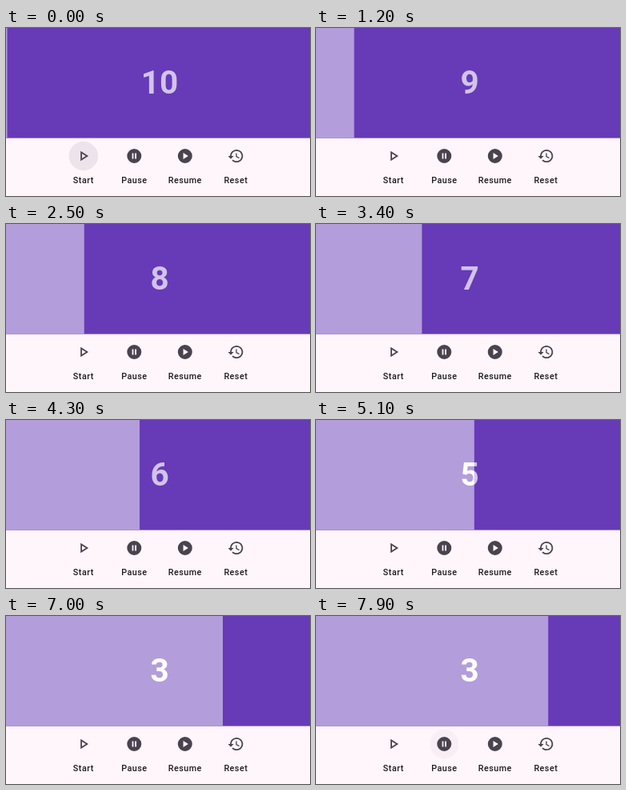
An HTML page that plays this animation: 380 px wide and 210 px high, repeating every 8 s.

```html
<!DOCTYPE html>
<html lang="en">
<head>
<meta charset="utf-8">
<title>Countdown</title>
<style>
  html, body { margin: 0; width: 100%; height: 100%; overflow: hidden; background: #fff6fc; }
  svg { display: block; width: 380px; height: 210px; }
  text { font-family: Roboto, sans-serif; text-anchor: middle; }
  .digit { font-size: 40.5px; font-weight: 700; }
  .label { font-size: 10.8px; font-weight: 500; letter-spacing: .45px; fill: #1d1b20; }
  .icon { fill: #49434f; }
  .halo { fill: #49434f; opacity: 0; }
</style>
</head>
<body>
<svg viewBox="0 0 380 210">
  <clipPath id="done"><rect id="bar" width="0" height="137.6"/></clipPath>
  <rect width="380" height="137.6" fill="#673ab7"/>
  <text class="digit" x="192" y="82" fill="#d1c4e9"></text>
  <g clip-path="url(#done)">
    <rect width="380" height="138" fill="#b39ddb"/>
    <text class="digit" x="192" y="82" fill="#fff"></text>
  </g>
  <g id="buttons"></g>
</svg>
<script>
const LOOP = 8000, STEP = 100, PAUSE_AT = 7500;
const disc = 'M12 2a10 10 0 1 0 0 20a10 10 0 1 0 0-20z';
const buttons = [
  ['Start', 'M10 8.64L15.27 12 10 15.36V8.64M8 5v14l11-7z'],
  ['Pause', disc + 'M9 8h2v8H9zM13 8h2v8h-2z'],
  ['Resume', disc + 'M9.5 16.5v-9l7 4.5z'],
  ['Reset', 'M13 3c-4.97 0-9 4.03-9 9H1l3.89 3.89.07.14L9 12H6c0-3.87 3.13-7 7-7s7 3.13 7 7-3.13 7-7 7c-1.93 0-3.68-.79-4.94-2.06l-1.42 1.42C8.27 19.99 10.51 21 13 21c4.97 0 9-4.03 9-9s-4.03-9-9-9zm-1 5v5l4.28 2.54.72-1.21-3.5-2.08V8z']
];

document.getElementById('buttons').innerHTML = buttons.map(([name, path], i) => `
  <g transform="translate(${96.8 + 63.5 * i} 160)">
    <circle class="halo" r="18.2"/>
    <path class="icon" fill-rule="evenodd" transform="scale(.9) translate(-12 -12)" d="${path}"/>
    <text class="label" y="34.2">${name}</text>
  </g>`).join('');

const bar = document.getElementById('bar');
const digits = document.querySelectorAll('.digit');
const halos = document.querySelectorAll('.halo');
const ramp = (t, from, to) => Math.min(1, Math.max(0, (t - from) / (to - from)));

function draw(t) {
  const x = 1.5 + 0.0385 * Math.min(t, PAUSE_AT);
  bar.setAttribute('width', x);
  const left = Math.ceil(10 - x / 38);
  digits.forEach(d => d.textContent = left);
  halos[0].style.opacity = 0.1 * (1 - ramp(t, 0, 400));
  halos[1].style.opacity = 0.055 * ramp(t, 7300, 7600) - 0.015 * ramp(t, 7800, 7900);
}

const start = performance.now();
function tick(now) {
  const t = Math.max(0, now - start) % LOOP;
  draw(Math.floor(t / STEP) * STEP);
  requestAnimationFrame(tick);
}
draw(0);
requestAnimationFrame(tick);
</script>
</body>
</html>
```
